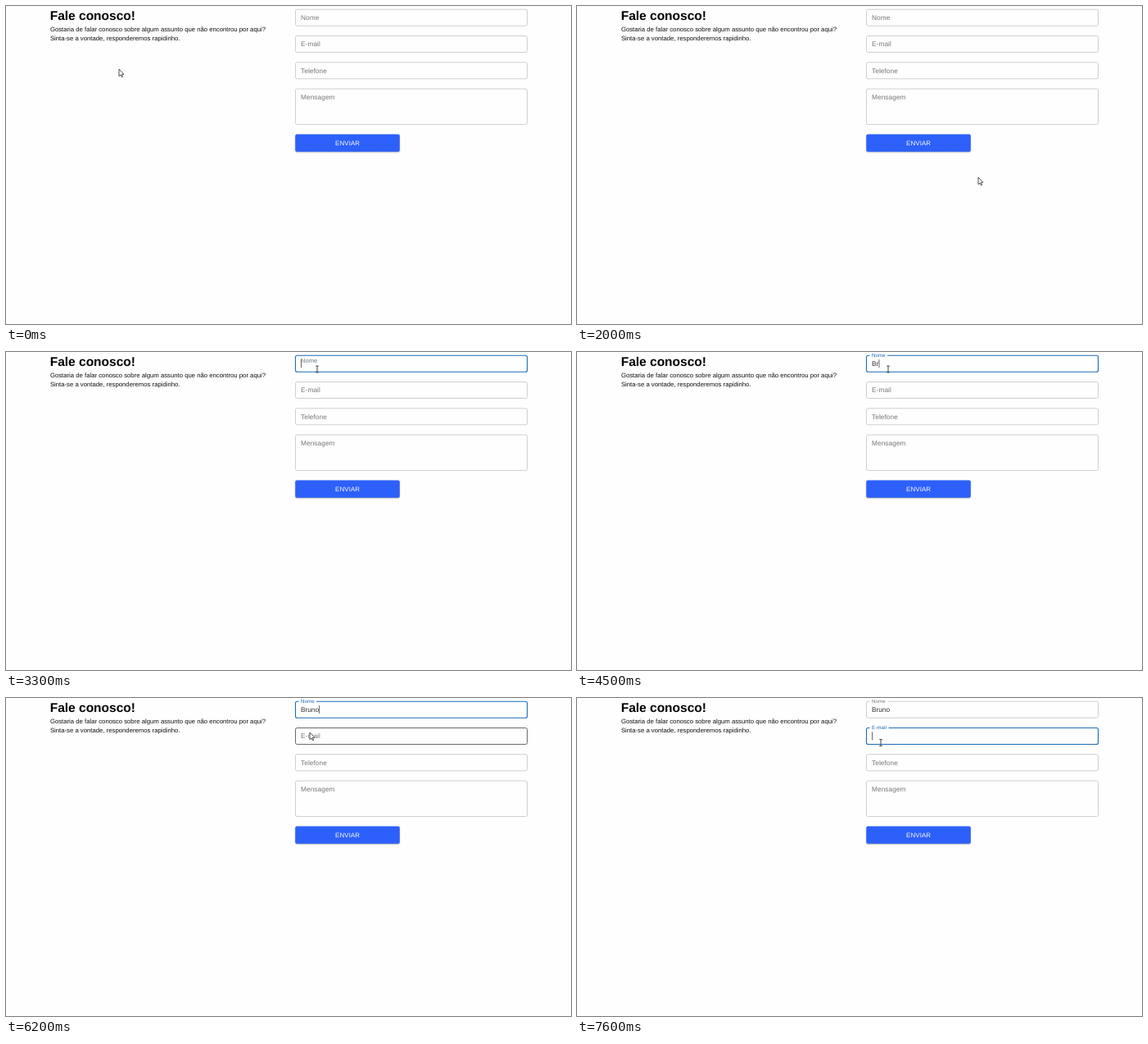
An HTML page with a canvas that plays this animation: 690 by 388 pixels, repeating every 8 s.

```html
<!DOCTYPE html>
<html lang="pt-BR">
<head>
<meta charset="utf-8">
<title>Fale conosco</title>
<style>
  html, body { margin: 0; width: 100%; height: 100%; overflow: hidden; background: #fefefe; }
  canvas { display: block; width: 690px; height: 388px; }
</style>
</head>
<body>
<canvas id="stage"></canvas>
<script>
const W = 690, H = 388, LOOP = 8000, TICK = 100, BLINK = 530;
const FONT = '"Liberation Sans", Arial, sans-serif';
const PAPER = '#fefefe', BLUE = [28, 108, 182], GRAY = [118, 118, 118];
const LEFT = 353.5, WIDTH = 283, TOP = 4.2, PITCH = 32.3, TEXT_X = 360;
const NAME = 'Bruno';
const TYPED_AT = [4200, 4500, 4900, 5000, 5100];

const FIELDS = [
  { label: 'Nome', height: 20, hover: 2900, focus: 3270, blur: 6500 },
  { label: 'E-mail', height: 20, hover: 6200, focus: 6500, blur: LOOP },
  { label: 'Telefone', height: 20 },
  { label: 'Mensagem', height: 43.4 }
].map((f, i) => ({ hover: Infinity, focus: Infinity, blur: Infinity, ...f, top: TOP + PITCH * i }));

const CARET_RESETS = [FIELDS[0].focus, ...TYPED_AT, FIELDS[1].focus];

// pointer moves: start, end, x, y
const REST = [138, 77];
const MOVES = [
  [100, 300, 261, 109], [1200, 1400, 245, 120], [1600, 1800, 448, 248],
  [1800, 2000, 490, 209], [2000, 2500, 478, 195], [2500, 2700, 317, 136],
  [2700, 2800, 352, 32], [2800, 3100, 380, 21], [5900, 6300, 368, 49],
  [7500, 7600, 371, 54.5]
];

const canvas = document.getElementById('stage');
const ctx = canvas.getContext('2d');
const dpr = window.devicePixelRatio || 1;
canvas.width = W * dpr;
canvas.height = H * dpr;

const mix = (a, b, k) => a + (b - a) * k;
const mixColor = (a, b, k) => `rgb(${a.map((v, i) => Math.round(mix(v, b[i], k)))})`;
const progress = (t, start, end) => t <= start ? 0 : Math.min(1, (t - start) / (end - start));

// cubic-bezier(0, 0, .2, 1)
function easeOut(x) {
  let lo = 0, hi = 1;
  for (let i = 0; i < 20; i++) {
    const u = (lo + hi) / 2;
    if (0.6 * u * u + 0.4 * u ** 3 < x) lo = u; else hi = u;
  }
  return hi * hi * (3 - 2 * hi);
}

function text(str, x, y, size, color, { weight = '', spacing = 0, align = 'left' } = {}) {
  ctx.font = `${weight} ${size}px ${FONT}`;
  ctx.letterSpacing = spacing + 'px';
  ctx.textAlign = align;
  ctx.fillStyle = color;
  ctx.fillText(str, x, y);
  return ctx.measureText(str).width;
}

function drawField(f, t) {
  const focused = t >= f.focus && t < f.blur;
  const hovered = t >= f.hover && t < f.focus;
  const shrink = t <= f.focus ? 0 : easeOut(progress(t, f.focus, f.focus + 200));
  const tint = progress(t, f.focus, f.focus + 200) - progress(t, f.blur, f.blur + 200);

  ctx.beginPath();
  ctx.roundRect(LEFT, f.top, WIDTH, f.height, 2);
  ctx.strokeStyle = focused ? `rgb(${BLUE})` : hovered ? '#5a5a5a' : '#cacaca';
  ctx.lineWidth = focused ? 1.1 : 0.9;
  ctx.stroke();

  const size = mix(8.27, 6.2, shrink);
  const y = f.top + mix(12.9, 1.9, shrink);
  if (shrink > 0.6) {
    ctx.font = `${size}px ${FONT}`;
    ctx.fillStyle = PAPER;
    ctx.fillRect(TEXT_X - 2.5, f.top - 1.2, ctx.measureText(f.label).width + 5, 2.4);
  }
  text(f.label, TEXT_X, y, size, mixColor(GRAY, BLUE, tint), { spacing: 0.08 });
}

function drawInput(t) {
  const typed = NAME.slice(0, TYPED_AT.filter(at => t >= at).length);
  const width = text(typed, TEXT_X, TOP + 12.9, 8.27, '#303030');
  const active = FIELDS.find(f => t >= f.focus && t < f.blur);
  if (!active) return;
  const reset = Math.max(...CARET_RESETS.filter(at => t >= at));
  if (Math.floor((t - reset) / BLINK) % 2) return;
  ctx.fillStyle = '#333';
  ctx.fillRect(TEXT_X + 0.3 + (active === FIELDS[0] ? width : 0), active.top + 4.9, 0.75, 10);
}

function drawButton() {
  ctx.save();
  ctx.shadowColor = 'rgba(0,0,0,.35)';
  ctx.shadowBlur = 1.6 * dpr;
  ctx.shadowOffsetY = 0.8 * dpr;
  ctx.beginPath();
  ctx.roundRect(353.3, 156.5, 127.5, 21.2, 2);
  ctx.fillStyle = '#2d60fb';
  ctx.fill();
  ctx.restore();
  text('ENVIAR', 417.1, 170, 7.9, '#fff', { spacing: 0.12, align: 'center' });
}

function pointerAt(t) {
  let [x, y] = REST;
  for (const [start, end, toX, toY] of MOVES) {
    const k = progress(t, start, end);
    x = mix(x, toX, k);
    y = mix(y, toY, k);
  }
  return [x, y];
}

function drawPointer(t) {
  const beam = (t >= 3000 && t < 6100) || t >= 7600;
  ctx.save();
  ctx.translate(...pointerAt(t));
  ctx.beginPath();
  if (beam) {
    for (const y of [-3.9, 3.9]) {
      ctx.moveTo(-1.8, y);
      ctx.lineTo(1.8, y);
    }
    ctx.moveTo(0, -3.9);
    ctx.lineTo(0, 3.9);
    ctx.strokeStyle = '#333';
    ctx.lineWidth = 0.9;
  } else {
    const arrow = new Path2D('M0 0V8.7L2 6.9L3.4 9.9L4.7 9.3L3.3 6.4L5.9 6.2Z');
    ctx.fillStyle = '#fff';
    ctx.fill(arrow);
    ctx.strokeStyle = '#2a2a2a';
    ctx.lineWidth = 0.8;
    ctx.stroke(arrow);
  }
  ctx.stroke();
  ctx.restore();
}

function draw(t) {
  ctx.setTransform(dpr, 0, 0, dpr, 0, 0);
  ctx.textRendering = 'geometricPrecision';
  ctx.fillStyle = PAPER;
  ctx.fillRect(0, 0, W, H);
  text('Fale conosco!', 53.7, 17, 15.5, '#000', { weight: 'bold' });
  text('Gostaria de falar conosco sobre algum assunto que não encontrou por aqui?', 53.9, 30.7, 7.74, '#111');
  text('Sinta-se a vontade, responderemos rapidinho.', 53.9, 42.4, 7.74, '#111');
  FIELDS.forEach(f => drawField(f, t));
  drawButton();
  drawInput(t);
  drawPointer(t);
}

const start = performance.now();
function loop() {
  const t = (performance.now() - start) % LOOP;
  draw(Math.floor(t / TICK) * TICK);
  requestAnimationFrame(loop);
}
loop();
</script>
</body>
</html>
```
